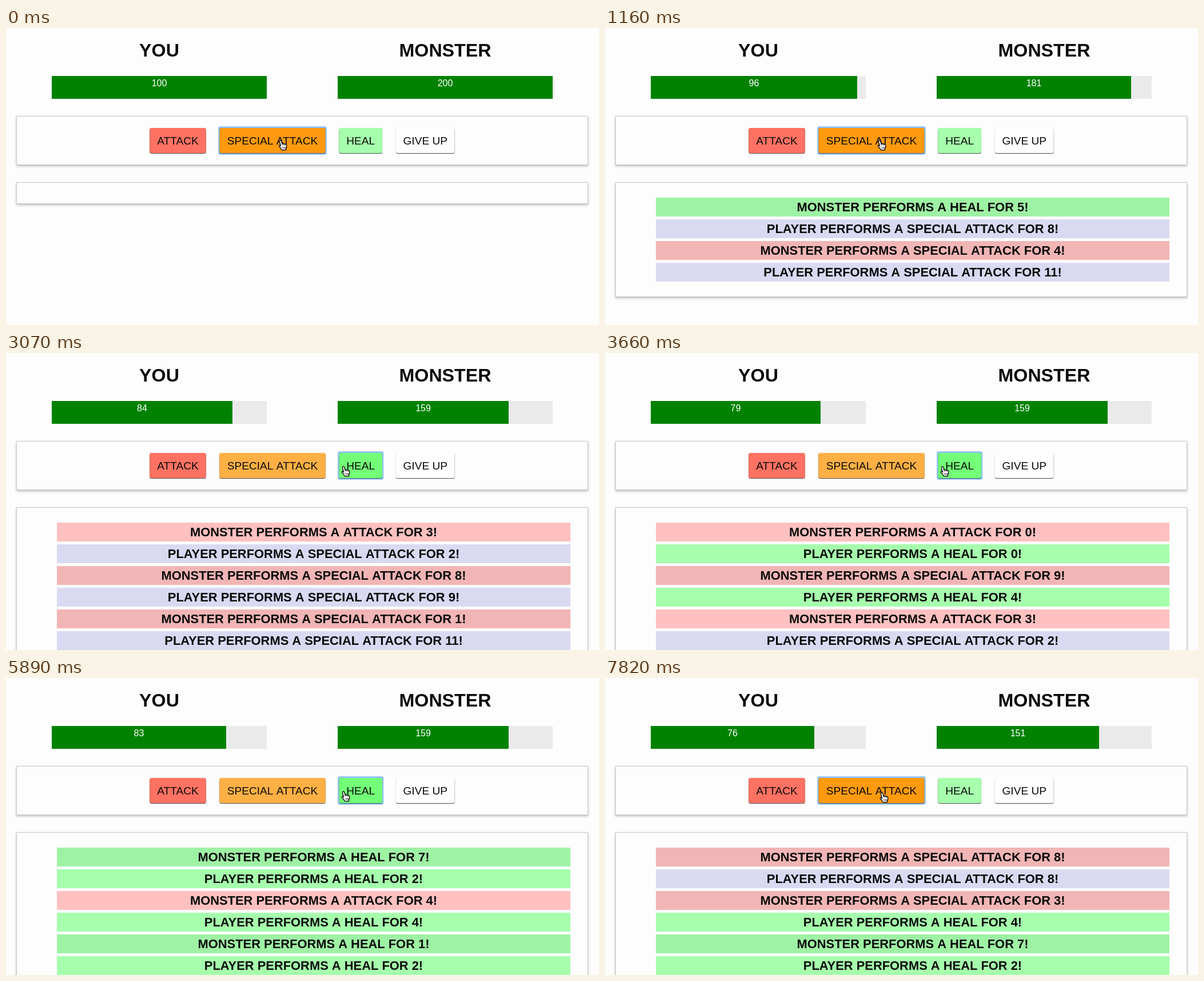
These frames come from a looping animation (1037x520 px, 8000 ms). An HTML page with a canvas:

```html
<!DOCTYPE html>
<html lang="en">
<head>
<meta charset="utf-8">
<title>Battle</title>
<style>
  html, body { margin: 0; width: 100%; height: 100%; overflow: hidden; background: #fdfdfd; }
  canvas { display: block; }
</style>
</head>
<body>
<canvas id="stage" width="1037" height="520"></canvas>
<script>
const ctx = document.getElementById('stage').getContext('2d');
const LOOP = 8000, STEP = 147, LAST_STEP = 53, BAR_TIME = 400;
const PAPER = '#fdfdfd', INK = '#0a0a0a';
const FONT = '"Liberation Sans", Arial, sans-serif';

// time, player move, amount, monster move, amount
const TURNS = [
  [130, 'SPECIAL ATTACK', 11, 'SPECIAL ATTACK', 4],
  [715, 'SPECIAL ATTACK', 8, 'HEAL', 5],
  [1290, 'SPECIAL ATTACK', 11, 'SPECIAL ATTACK', 1],
  [1871, 'SPECIAL ATTACK', 9, 'SPECIAL ATTACK', 8],
  [2470, 'SPECIAL ATTACK', 2, 'ATTACK', 3],
  [3190, 'HEAL', 4, 'SPECIAL ATTACK', 9],
  [3640, 'HEAL', 0, 'ATTACK', 0],
  [4582, 'HEAL', 2, 'HEAL', 1],
  [5270, 'HEAL', 4, 'ATTACK', 4],
  [5852, 'HEAL', 2, 'HEAL', 7],
  [6440, 'HEAL', 4, 'SPECIAL ATTACK', 3],
  [7419, 'SPECIAL ATTACK', 8, 'SPECIAL ATTACK', 8]
];

const ROW_COLORS = {
  PLAYER: { 'SPECIAL ATTACK': '#d9daf2', HEAL: '#a6ffac' },
  MONSTER: { 'SPECIAL ATTACK': '#f2b5b5', ATTACK: '#ffc0c0', HEAL: '#9ef2a4' }
};

const BUTTONS = [
  { label: 'ATTACK', x: 251.5, w: 98, color: '#ff7263', hover: '#ff4d3a' },
  { label: 'SPECIAL ATTACK', x: 373.5, w: 185, color: '#ffb045', hover: '#ff9a0e' },
  { label: 'HEAL', x: 582.5, w: 75.5, color: '#a6ffac', hover: '#73ff77' },
  { label: 'GIVE UP', x: 682, w: 102.5, color: '#fefefe', hover: '#f2f2f2' }
];
const BUTTON_TOP = 175, BUTTON_H = 44;

// time, x, y
const POINTER = [
  [0, 484, 205], [2560, 484, 205], [2920, 594, 207],
  [6640, 594, 207], [7220, 488, 209], [LOOP, 488, 209]
];
const HAND = new Path2D('M-3.5 2L-5.5-6Q-5.6-8.5-3.6-8.3Q-2.5-8-2.1-6.5L-1-2.2' +
  'Q.2-3.4 1.5-2Q3-3 4-1.4Q6.4-2 6.8.8Q7 4 5.5 6L5.5 8.7L-1.5 8.7' +
  'Q-3 5.5-6.5 2.2Q-7 0-5.2.2Q-4 .6-3.5 2Z');
const KNUCKLES = new Path2D('M-1-2.2L-.4.6M1.5-2L2 .6M4-1.4L4.4.8M.1 3.2V6.4M2.2 3.2V6.4M4.1 3.2V6.4');

const mix = (a, b, p) => a + (b - a) * p;

// CSS "ease": cubic-bezier(.25, .1, .25, 1)
function ease(x) {
  if (x <= 0) return 0;
  if (x >= 1) return 1;
  const curve = (u, a, b) => 3 * a * u * (1 - u) ** 2 + 3 * b * u * u * (1 - u) + u ** 3;
  let lo = 0, hi = 1;
  for (let i = 0; i < 20; i++) {
    const mid = (lo + hi) / 2;
    if (curve(mid, 0.25, 0.25) < x) lo = mid; else hi = mid;
  }
  return curve(lo, 0.1, 1);
}

function text(str, x, y, size, color = INK, weight = 'normal') {
  ctx.font = `${weight} ${size}px ${FONT}`;
  ctx.textAlign = 'center';
  ctx.fillStyle = color;
  ctx.fillText(str, x, y);
}

function rect(x, y, w, h, color) {
  ctx.fillStyle = color;
  ctx.fillRect(x, y, w, h);
}

function rounded(x, y, w, h, r, color) {
  ctx.beginPath();
  ctx.roundRect(x, y, w, h, r);
  ctx.fillStyle = color;
  ctx.fill();
}

function withShadow(color, blur, dy, draw) {
  ctx.save();
  ctx.shadowColor = color;
  ctx.shadowBlur = blur;
  ctx.shadowOffsetY = dy;
  draw();
  ctx.restore();
}

function panel(top, bottom) {
  withShadow('#bbb', 4, 2, () => rect(18, top, 1000, bottom - top, '#c8c8c8'));
  rect(19, top + 1, 998, bottom - top - 2, PAPER);
}

function battle(t) {
  const you = { now: 100, from: 100 }, monster = { now: 200, from: 200 };
  const log = [];
  let since = 0;
  for (const [at, move, amount, reply, damage] of TURNS) {
    if (at > t) break;
    since = at;
    you.from = you.now;
    monster.from = monster.now;
    if (move === 'HEAL') you.now += amount; else monster.now -= amount;
    if (reply !== 'HEAL') you.now -= damage;
    log.unshift(['MONSTER', reply, damage], ['PLAYER', move, amount]);
  }
  return { you, monster, log, progress: ease((t - since) / BAR_TIME) };
}

function bar(x, title, health, max, progress) {
  const w = Math.round(376 * mix(health.from, health.now, progress) / max);
  text(title, x + 188, 50, 32.2, INK, 'bold');
  rect(x, 84, 376, 40, '#eaeaea');
  rect(x, 84, w, 40, '#008200');
  text(health.now, x + w / 2, 102, 16, '#fff');
}

function button({ label, x, w, color, hover }, focused, pointer) {
  const over = pointer.x >= x && pointer.x <= x + w;
  const face = over ? hover : color;
  withShadow('rgba(0,0,0,.35)', 2, 1, () => rounded(x, BUTTON_TOP, w, BUTTON_H, 3, face));
  if (focused) {
    withShadow('#a9d0ff', 2, 0, () =>
      rounded(x - 2, BUTTON_TOP - 2.5, w + 4, BUTTON_H + 5, 3, '#8dc0fa'));
  }
  rounded(x, BUTTON_TOP + 1, w, BUTTON_H, 3, 'rgba(0,0,0,.5)');
  rounded(x, BUTTON_TOP, w, BUTTON_H, 3, face);
  text(label, x + w / 2, 204, 19.1);
}

function pointerAt(t) {
  const i = POINTER.findIndex(p => p[0] > t);
  const [t0, x0, y0] = POINTER[i - 1], [t1, x1, y1] = POINTER[i];
  const u = (t - t0) / (t1 - t0), p = u * u * (3 - 2 * u);
  return { x: mix(x0, x1, p), y: mix(y0, y1, p) };
}

function hand({ x, y }) {
  ctx.save();
  ctx.translate(x, y);
  ctx.lineJoin = 'round';
  ctx.strokeStyle = '#000';
  ctx.fillStyle = '#fff';
  ctx.lineWidth = 1.3;
  ctx.fill(HAND);
  ctx.stroke(HAND);
  ctx.lineWidth = 0.8;
  ctx.stroke(KNUCKLES);
  ctx.restore();
}

function draw(t) {
  const { you, monster, log, progress } = battle(t);
  const pointer = pointerAt(t);
  const focus = t > 3040 && t < 7400 ? 'HEAL' : 'SPECIAL ATTACK';

  rect(0, 0, 1037, 520, PAPER);
  bar(80, 'YOU', you, 100, progress);
  bar(580, 'MONSTER', monster, 200, progress);

  panel(154, 240);
  for (const b of BUTTONS) button(b, b.label === focus, pointer);

  panel(270, log.length ? 319 + 38 * log.length : 308);
  log.slice(0, 6).forEach(([who, move, amount], i) => {
    const y = 297 + 38 * i;
    rect(89, y, 898, 33, ROW_COLORS[who][move]);
    text(`${who} PERFORMS A ${move} FOR ${amount}!`, 538, y + 24, 21.9, INK, 'bold');
  });
  hand(pointer);
}

// The picture advances in even steps, like a screen recording.
const start = performance.now();
function tick() {
  const t = (performance.now() - start) % LOOP;
  draw(Math.min(LAST_STEP, Math.floor((t + 35) / STEP)) * STEP);
  requestAnimationFrame(tick);
}
tick();
</script>
</body>
</html>
```
